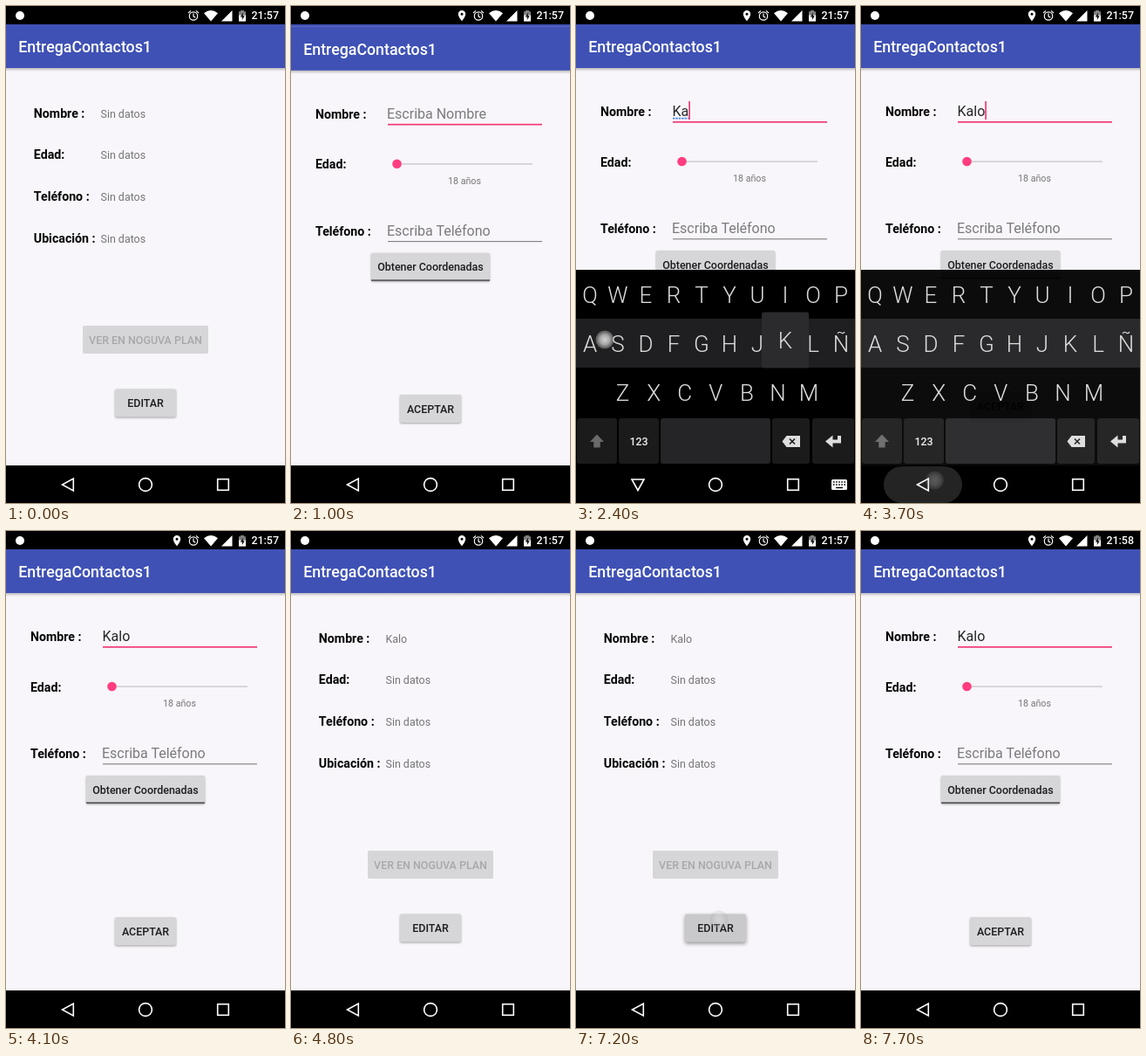
Recreate the animation shown at these times as an HTML page. Size 320x569 px, loop 8 s.

```html
<!DOCTYPE html>
<html lang="es">
<head>
<meta charset="utf-8">
<title>Formulario</title>
<style>
  html, body { margin: 0; width: 100%; height: 100%; overflow: hidden; background: #000; }
  svg { display: block; width: 100%; height: 100%; }
  text { font-family: Roboto, sans-serif; white-space: pre; }
  .title { font-size: 17.8px; font-weight: 500; fill: #fff; }
  .label { font-size: 14.2px; font-weight: 700; fill: #050505; }
  .value { font-size: 12.44px; fill: #757477; }
  .field { font-size: 16px; fill: #252527; }
  .hint { font-size: 16px; fill: #7b7a7d; }
  .small { font-size: 10.67px; fill: #757477; text-anchor: middle; }
  .caption { font-size: 12.44px; font-weight: 500; fill: #1c1c1d; text-anchor: middle; }
  .key { font-size: 26px; font-weight: 300; fill: #dcdcdc; text-anchor: middle; }
  .raised { filter: drop-shadow(0 1px 1px rgba(0,0,0,.35)); }
  .pressed { filter: drop-shadow(0 2px 2px rgba(0,0,0,.4)); }
  .pressed rect { fill: #c9c8cb; }
</style>
</head>
<body>
<svg viewBox="0 0 320 569" preserveAspectRatio="none">
  <defs>
    <linearGradient id="barShadow" x2="0" y2="1">
      <stop stop-color="#000" stop-opacity=".24"/><stop offset="1" stop-color="#000" stop-opacity="0"/>
    </linearGradient>
    <radialGradient id="spot">
      <stop stop-color="#f2f2f2" stop-opacity=".9"/>
      <stop offset=".55" stop-color="#cfcfcf" stop-opacity=".8"/>
      <stop offset="1" stop-color="#8c8c8c" stop-opacity=".5"/>
    </radialGradient>
  </defs>
  <g id="main"></g>
  <g id="edit"></g>
  <g id="keyboard"></g>
  <g id="system"></g>
  <circle id="touch" r="10.5" fill="url(#spot)"/>
</svg>
<script>
const LOOP = 8000, STEP = 100;
const APP = 'EntregaContactos1', NAME = 'Kalo', EMPTY = 'Sin datos';
const $ = id => document.getElementById(id);

const text = (x, y, cls, str, attrs = '') => `<text x="${x}" y="${y}" class="${cls}" ${attrs}>${str}</text>`;
const rect = (x, y, w, h, fill, attrs = '') =>
  `<rect x="${x}" y="${y}" width="${w}" height="${h}" fill="${fill}" ${attrs}/>`;
const path = (d, attrs) => `<path d="${d}" ${attrs}/>`;
const button = (x, y, w, str, id) =>
  `<g id="${id}" class="raised">${rect(x, y, w, 32, '#d6d5d8', 'rx="1.8"')}${text(x + w / 2, y + 20.5, 'caption', str)}</g>`;
const appWindow = content =>
  rect(0, 21, 320, 548, '#f8f6fa') + rect(0, 21, 320, 50, '#3f51b5') +
  rect(0, 71, 320, 4, 'url(#barShadow)') + text(14.2, 53.4, 'title', APP) + content;

// Summary screen
const rows = ['Nombre :', 'Edad:', 'Teléfono :', 'Ubicación :'];
$('main').innerHTML = appWindow(
  rows.map((row, i) => {
    const y = 127.8 + i * 47.6;
    return text(31.8, y, 'label', row) + text(108.5, y, 'value', EMPTY, i ? '' : 'id="savedName"');
  }).join('') +
  rect(88, 366, 144, 32, '#d6d5d8', 'rx="1.8"') +
  text(160, 387.4, 'caption', 'VER EN NOGUVA PLAN', 'style="fill:#a8a7aa"') +
  button(125, 438.5, 70, 'EDITAR', 'editButton'));

// Form screen
$('edit').innerHTML = appWindow(
  text(28, 126, 'label', 'Nombre :') + text(28, 183.5, 'label', 'Edad:') + text(28, 260, 'label', 'Teléfono :') +
  text(110, 126, 'hint', 'Escriba Nombre', 'id="nameHint"') + text(110.5, 126, 'field', '', 'id="nameField"') +
  rect(111, 132, 177, 1.7, '#f23a78') +
  path('', 'id="squiggle" stroke="#4a86e0" stroke-width="1.8" stroke-dasharray="2.4 1" fill="none"') +
  rect(0, 109, 1.7, 21, '#f23a78', 'id="caret"') +
  rect(121, 177.3, 156, 1.6, '#d0cfd3') + '<circle cx="121.5" cy="178" r="5.3" fill="#ff3d7f"/>' +
  text(199, 200.8, 'small', '18 años') +
  text(110, 260, 'hint', 'Escriba Teléfono') + rect(111, 266.3, 177, 1, '#737276') +
  button(92, 280, 136, 'Obtener Coordenadas', 'coordsButton') + rect(92, 310.5, 136, 1.5, '#4b4a4d') +
  button(125, 442.3, 70, 'ACEPTAR', 'acceptButton'));

// Keyboard
const keyRows = [
  { letters: 'QWERTYUIOP', x: 16, pitch: 32, y: 339.5 },
  { letters: 'ASDFGHJKLÑ', x: 16, pitch: 32, y: 395.5 },
  { letters: 'ZXCVBNM', x: 53.5, pitch: 35.6, y: 451.5 }
];
const keyPos = letter => {
  const row = keyRows.find(r => r.letters.includes(letter));
  return { x: row.x + row.pitch * row.letters.indexOf(letter), y: row.y };
};
const keyBox = (x, w, fill = '#1b1b1c') => rect(x, 472, w, 52, fill, 'rx="3"');
$('keyboard').innerHTML =
  rect(0, 302, 320, 267, '#000') + rect(0, 358, 320, 56, '#1f1f21') +
  keyRows.flatMap(r => [...r.letters]).map(c => text(keyPos(c).x, keyPos(c).y, 'key', c)).join('') +
  keyBox(1, 46) + keyBox(49, 46) + keyBox(97, 126, '#252527') + keyBox(225, 43) + keyBox(271, 48) +
  path('M24 490.5l8 8.5h-4.3v6.5h-7.4v-6.5H16z', 'id="shift"') +
  text(72, 503, 'caption', '123', 'style="fill:#eee"') +
  `<g id="language">${text(160, 502.5, 'value', 'Español', 'text-anchor="middle" style="fill:#c4c4c4"')}` +
  path('M132 495v7l-6-3.5zM188 495v7l6-3.5z', 'fill="none" stroke="#c4c4c4"') + '</g>' +
  path('M236.5 498.5l5-6.5h15.5v13h-15.5z', 'fill="#ddd"') +
  path('M245 495.5l6 6m0-6l-6 6', 'stroke="#1b1b1c" stroke-width="1.6"') +
  path('M302 492v6.5h-9', 'fill="none" stroke="#ddd" stroke-width="4"') + path('M286 498.5l8.5-7v14z', 'fill="#ddd"') +
  `<g id="popup">${rect(-27, -45, 54, 64, '#2b2b2d', 'rx="3"')}${text(0, -3.5, 'key', '', 'id="popupLetter"')}</g>`;

// Status and navigation bars
const line = 'fill="none" stroke="#fff" stroke-width="1.6"';
$('system').innerHTML =
  rect(0, 0, 320, 21, '#000') + rect(0, 526, 320, 43, '#000') +
  '<circle cx="16" cy="11" r="5" fill="#fff"/>' +
  path('M196 5a4.2 4.2 0 0 0-4.2 4.2c0 3.2 4.2 8 4.2 8s4.2-4.8 4.2-8A4.2 4.2 0 0 0 196 5zm0 2.7a1.5 1.5 0 1 1 0 3 1.5 1.5 0 0 1 0-3z',
    'id="pin" fill="#fff" fill-rule="evenodd"') +
  '<circle cx="215" cy="11.5" r="4.7" fill="none" stroke="#fff" stroke-width="1.2"/>' +
  path('M215 8.5v3.3l2.3 1.4M209 8l3-2.6M221 8l-3-2.6', 'fill="none" stroke="#fff" stroke-width="1.2"') +
  path('M227 8.2Q235 1.8 243 8.2L235 17.6zM259.5 5v12.6H247z', 'fill="#fff"') +
  path('M269 5h4v1.3h2v4h-8v-4h2z', 'fill="#808080"') + rect(267, 10.3, 8, 7.3, '#fff') +
  path('M271.8 7.8l-3 4.6h2v3.6l3-4.8h-2z', 'fill="#111"') +
  text(313, 15.4, 'caption', '', 'id="clock" style="fill:#fff;text-anchor:end"') +
  rect(26, 527, 90, 42, '#fff', 'id="ripple" rx="21"') +
  path('', `id="back" ${line}`) +
  `<circle cx="160" cy="548" r="7.4" ${line}/>` + rect(242.7, 541.7, 12.6, 12.6, 'none', 'stroke="#fff" stroke-width="1.6"') +
  `<g id="imeIcon">${rect(293, 542, 18, 12, '#fff', 'rx="1.5"')}` +
  path('M295 545h14M295 548h14', 'stroke="#000" stroke-width="1.5" stroke-dasharray="1.6 1.5"') +
  path('M298 551.5h8', 'stroke="#000" stroke-width="1.4"') + '</g>';

// Linear interpolation through [time, value] points
function track(t, points) {
  const i = points.findIndex(p => p[0] > t);
  if (i < 0) return points[points.length - 1][1];
  if (i === 0) return points[0][1];
  const [t0, a] = points[i - 1], [t1, b] = points[i];
  return a + (b - a) * (t - t0) / (t1 - t0);
}
const within = (t, a, b) => t >= a && t < b;
const show = (id, on) => $(id).style.display = on ? '' : 'none';

const strokes = [2100, 2400, 2700, 3000].map((time, i) => ({ time, letter: NAME[i].toUpperCase() }));
const taps = [
  { from: 500, to: 700, x: 162, y: 452 },
  { from: 2100, to: 2200, ...keyPos('K'), dy: -9 },
  { from: 2400, to: 2500, x: 33, y: 382 },
  { from: 2700, to: 2800, ...keyPos('L'), dy: -9 },
  { from: 3000, to: 3100, ...keyPos('O'), dy: -9 },
  { from: 3500, to: 3600, x: 84.5, y: 543 },
  { from: 4300, to: 4400, x: 162, y: 456 },
  { from: 5300, to: 6500, y: 129.5, path: [[5300, 115], [5700, 213], [6100, 172], [6500, 222]] },
  { from: 7000, to: 7100, x: 164, y: 445 }
];

function drawTouch(t) {
  const tap = taps.find(p => within(t, p.from, p.to + 200));
  show('touch', tap);
  if (!tap) return;
  $('touch').setAttribute('cx', tap.path ? track(t, tap.path) : tap.x);
  $('touch').setAttribute('cy', tap.y + (tap.dy || 0));
  $('touch').setAttribute('opacity', track(t, [[tap.to, .95], [tap.to + 100, .3], [tap.to + 200, 0]]));
}

function drawScreens(t) {
  const open = track(t, [[700, 0], [1100, 1], [4400, 1], [4800, 0], [7200, 0], [7600, 1]]);
  $('edit').setAttribute('opacity', Math.min(1, open * 1.6));
  $('edit').setAttribute('transform', `translate(0 ${45 * (1 - open) ** 2})`);
  show('edit', open > 0);
  $('savedName').textContent = t < 2000 ? EMPTY : NAME;
  $('editButton').setAttribute('class', within(t, 500, 1000) || within(t, 7000, 7600) ? 'pressed' : 'raised');
  $('acceptButton').setAttribute('class', within(t, 4300, 4800) ? 'pressed' : 'raised');

  // The first two letters land quickly, the rest follow their taps
  const typed = [2200, 2400, 2800, 3100].filter(time => t >= time).length;
  $('nameField').textContent = NAME.slice(0, typed);
  show('nameHint', !typed);
  const end = 110.5 + (typed ? $('nameField').getComputedTextLength() : 0);
  $('caret').setAttribute('x', end);
  show('caret', within(t, 1700, 4100));
  $('squiggle').setAttribute('d', `M111 128.6H${end}`);
  show('squiggle', typed && t < 3500);
}

function drawKeyboard(t) {
  const alpha = track(t, [[1300, 0], [1400, .15], [1500, .42], [1600, .71], [1700, .88], [1900, 1],
    [3600, 1], [3700, .95], [3800, .7], [3900, .35], [4000, .1], [4100, 0]]);
  const drop = track(t, [[1400, 22], [1600, 16.5], [1700, 9], [1800, 3], [1900, 0], [3700, 0], [3900, 8], [4100, 22]]);
  $('keyboard').setAttribute('opacity', alpha);
  $('keyboard').setAttribute('transform', `translate(0 ${drop})`);
  show('keyboard', alpha > 0);
  $('shift').setAttribute('fill', t < 2200 ? '#fff' : '#6a6a6a');
  $('language').setAttribute('opacity', track(t, [[1900, 1], [2300, 0]]));
  const stroke = strokes.find(s => within(t, s.time + 100, s.time + 400));
  show('popup', stroke);
  if (!stroke) return;
  const { x, y } = keyPos(stroke.letter);
  $('popup').setAttribute('transform', `translate(${x} ${y})`);
  $('popupLetter').textContent = stroke.letter;
}

function drawSystem(t) {
  const typing = within(t, 1300, 3600);
  show('pin', t >= 1000);
  show('imeIcon', typing);
  $('clock').textContent = t < 7400 ? '21:57' : '21:58';
  $('back').setAttribute('d', typing ? 'M64 542h14l-7 12.5z' : 'M77.3 541v14l-12.8-7z');
  $('ripple').setAttribute('opacity', track(t, [[3400, 0], [3500, .1], [3700, .14], [4100, 0]]));
}

function frame(now) {
  const t = Math.floor(now % LOOP / STEP) * STEP;
  drawScreens(t);
  drawKeyboard(t);
  drawSystem(t);
  drawTouch(t);
  requestAnimationFrame(frame);
}
frame(0);
</script>
</body>
</html>
```
